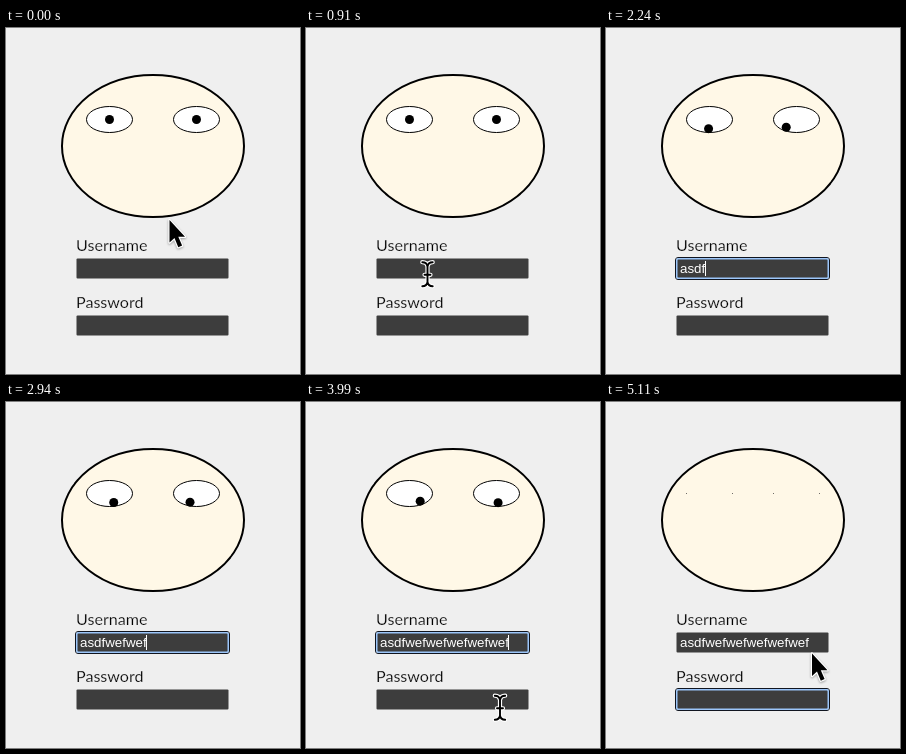
An HTML page that plays this animation: 294 by 346 pixels, repeating every 5180 ms.

```html
<!DOCTYPE html>
<html lang="en">
<head>
<meta charset="utf-8">
<title>Login face</title>
<style>
  html, body { margin: 0; width: 100%; height: 100%; overflow: hidden; background: #efefef; }
  svg { display: block; width: 294px; height: 346px; }
  .label { font: 16.1px Lato, sans-serif; fill: #000; stroke: #efefef; stroke-width: .25; }
  .value { font: 13.333px "Liberation Sans", Arial, sans-serif; fill: #fff; }
  .eye { fill: #fff; stroke: #000; }
  #arrow { filter: drop-shadow(0 1px 1px #0005); }
</style>
</head>
<body>
<svg viewBox="0 0 294 346">
  <defs>
    <rect id="field" x="70.5" y=".5" width="152" height="20" rx="1" fill="#3d3d3d"/>
    <g id="focus" fill="none">
      <rect x="69.5" y="-.5" width="154" height="22" rx="2.5" stroke="#10151f"/>
      <rect x="70.75" y=".75" width="151.5" height="19.5" rx="1.5" stroke="#9cc6fa" stroke-width="1.5"/>
    </g>
    <path id="beamShape" d="M-5.2-11.8Q-.6-11.8 0-7.5Q.6-11.8 5.2-11.8M0-8V8.5M-5.2 12.3Q-.6 12.3 0 8Q.6 12.3 5.2 12.3M-3 .8H3"/>
  </defs>
  <rect width="294" height="346" fill="#efefef"/>
  <ellipse cx="147" cy="118" rx="91" ry="71" fill="#fff8e7" stroke="#000" stroke-width="2"/>
  <g id="eyes"></g>
  <text class="label" x="70" y="223">Username</text>
  <text class="label" x="70" y="280">Password</text>
  <use href="#field" y="230"/>
  <use href="#field" y="287"/>
  <use id="userFocus" href="#focus" y="230"/>
  <use id="passFocus" href="#focus" y="287"/>
  <text id="value" class="value" x="74" y="245"></text>
  <rect id="caret" width="1" height="15" fill="#fff"/>
  <g id="cursor">
    <path id="arrow" d="M0 0V22.5L5 18L8.8 27.2L12.6 25.6L8.8 16.8H15.5Z" stroke="#fff" stroke-width="2.4" paint-order="stroke" stroke-linejoin="round"/>
    <g id="beam" fill="none" stroke-linecap="round">
      <use href="#beamShape" stroke="#fff" stroke-width="4.2"/>
      <use href="#beamShape" stroke="#000" stroke-width="1.9"/>
    </g>
  </g>
</svg>
<script>
const LOOP = 5180, USER = 950, PASS = 4430, CLOSE = 260, BLINK = 500;
const HIDE = 1300, REAPPEAR = 3540;
const TEXT = 'asdf' + 'wef'.repeat(5);
const SLOW_KEYS = [1470, 1820, 2100, 2200];
const keyTime = i => SLOW_KEYS[i] ?? 2520 + 74 * (i - SLOW_KEYS.length);
const KEYS = [...TEXT].map((_, i) => keyTime(i));

// Pointer stops: time, x, y
const STOPS = [[0, 163.5, 192], [70, 163.5, 192], [630, 136, 251], [910, 121.5, 246],
  [HIDE, 121.5, 246], [REAPPEAR, 270, 284], [3990, 194, 305.5], [4830, 191.5, 305.5],
  [5110, 206, 251.5], [LOOP, 206, 251.5]];

const $ = id => document.getElementById(id);
const show = (el, on) => el.setAttribute('visibility', on ? 'visible' : 'hidden');
const set = (el, attrs) => { for (const k in attrs) el.setAttribute(k, attrs[k]); };
const clamp = v => Math.min(1, Math.max(0, v));
const ease = p => 1 - (1 - clamp(p)) ** 2.5;
const mix = (a, b, p) => a + (b - a) * p;

function add(tag, attrs) {
  const el = document.createElementNS('http://www.w3.org/2000/svg', tag);
  set(el, attrs);
  $('eyes').append(el);
  return el;
}

const EY = 91.5, EYE_RX = 23, EYE_RY = 13, PUPIL = 4.5;
const eyes = [103.5, 190.5].map(x => ({
  x,
  white: add('ellipse', { class: 'eye', cx: x, cy: EY, rx: EYE_RX }),
  pupil: add('ellipse', { rx: PUPIL }),
  dots: [-EYE_RX, EYE_RX].map(d => add('rect', {
    x: x + d - .5, y: EY - .5, width: 1, height: 1, fill: '#333', opacity: .7
  }))
}));

const measure = document.createElement('canvas').getContext('2d');
measure.font = '13.333px "Liberation Sans", Arial, sans-serif';
const caretAt = n => 74 + measure.measureText(TEXT.slice(0, n)).width;

// Pupil offsets toward a caret on the username line
function look(cx) {
  return eyes.flatMap(({ x }) => {
    const dx = cx - x, dy = 148.5, len = Math.hypot(dx, dy);
    return [19.2 * dx / len, 9.2 * dy / len];
  });
}

// Each move starts from wherever the previous one had got to
const moves = [];
function aim(t, to, dur = 200) {
  moves.push({ t, dur, from: gaze(t), to });
}
function gaze(t) {
  const m = moves.findLast(m => m.t <= t);
  if (!m) return [0, 0, 0, 0];
  const p = ease((t - m.t) / m.dur);
  return m.to.map((v, i) => mix(m.from[i], v, p));
}
aim(USER, look(caretAt(0)));
KEYS.forEach((t, i) => aim(t, look(caretAt(i + 1))));
aim(PASS, [0, 0, 0, 0], CLOSE);

function drawEyes(t) {
  const off = gaze(t), open = 1 - ease((t - PASS) / CLOSE), shut = open < .02;
  eyes.forEach((e, i) => {
    set(e.white, { ry: EYE_RY * open });
    set(e.pupil, { cx: e.x + off[2 * i], cy: EY + off[2 * i + 1], ry: PUPIL * open });
    show(e.white, !shut);
    show(e.pupil, !shut);
    e.dots.forEach(d => show(d, shut));
  });
}

function drawForm(t) {
  const n = KEYS.filter(k => k <= t).length;
  const inUser = t >= USER && t < PASS, inPass = t >= PASS;
  const since = t - (inPass ? PASS : n ? KEYS[n - 1] : USER);
  $('value').textContent = TEXT.slice(0, n);
  show($('userFocus'), inUser);
  show($('passFocus'), inPass);
  set($('caret'), { x: Math.floor(caretAt(inPass ? 0 : n)), y: inPass ? 290 : 233 });
  show($('caret'), (inUser || inPass) && Math.floor(since / BLINK) % 2 === 0);
}

function drawCursor(t) {
  const i = STOPS.findIndex(s => s[0] > t);
  const [t0, x0, y0] = STOPS[i - 1], [t1, x1, y1] = STOPS[i];
  const p = (t - t0) / (t1 - t0), x = mix(x0, x1, p), y = mix(y0, y1, p);
  const on = t < HIDE || t >= REAPPEAR;
  const text = x > 70 && x < 223 && [230, 287].some(top => y > top && y < top + 20);
  set($('cursor'), { transform: `translate(${x} ${y})` });
  show($('arrow'), on && !text);
  show($('beam'), on && text);
}

const start = performance.now();
function frame(now) {
  const t = Math.max(0, now - start) % LOOP;
  drawEyes(t);
  drawForm(t);
  drawCursor(t);
  requestAnimationFrame(frame);
}
frame(start);
</script>
</body>
</html>
```
